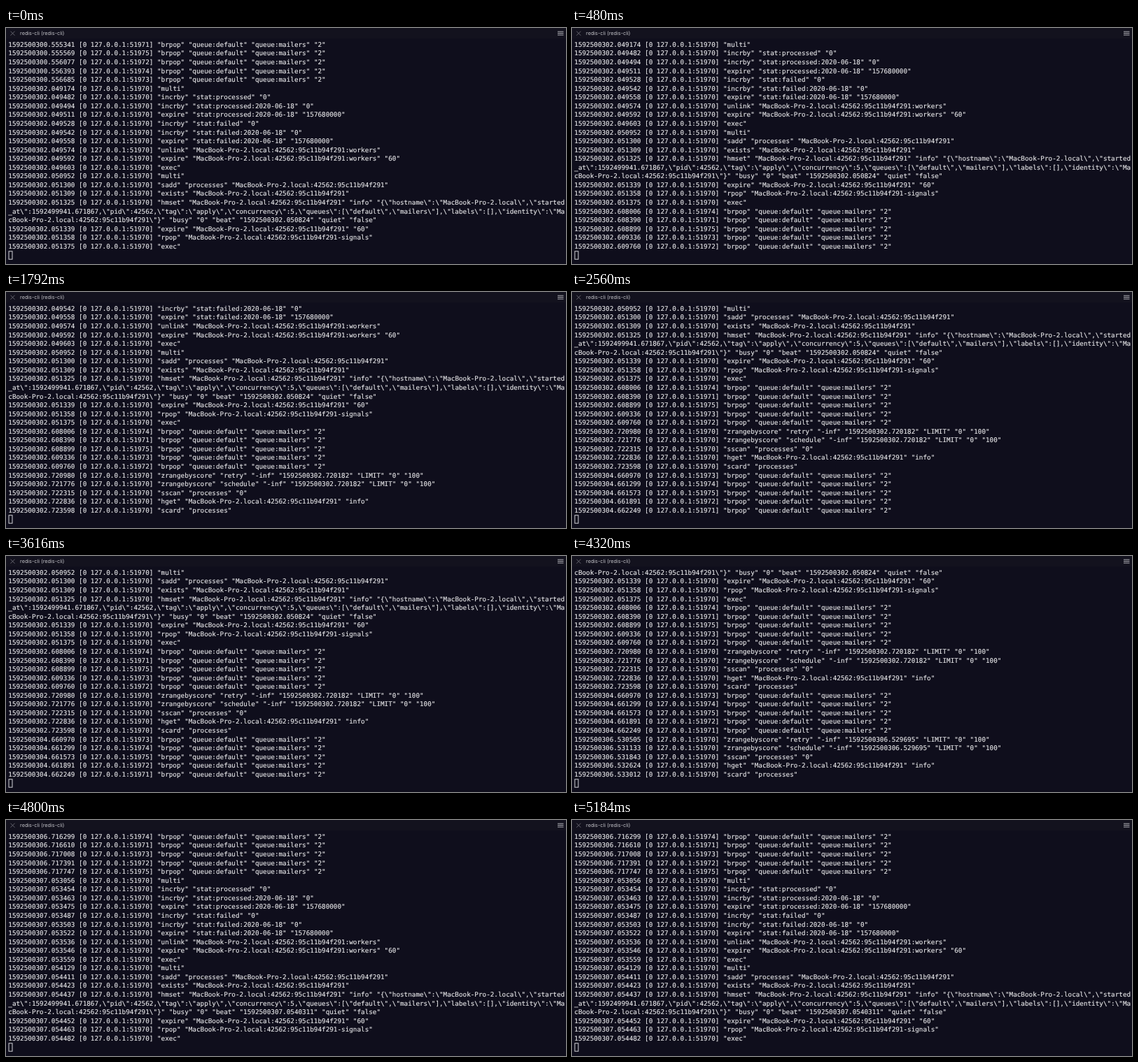
These frames come from a looping animation (800 px wide and 338 px high, 5.44 s). An HTML page:

```html
<!DOCTYPE html>
<html lang="en">
<head>
<meta charset="utf-8">
<title>redis-cli monitor</title>
<style>
  html, body { margin: 0; width: 100%; height: 100%; overflow: hidden; background: #0f0e1c; }
  svg { display: block; width: 800px; height: 338px; }
  text { text-rendering: geometricPrecision; }
  #log { font: 9.305px "DejaVu Sans Mono", Menlo, monospace; fill: #e6e6e8; stroke: #e6e6e8; stroke-width: .15; }
  #title { font: 7.3px Inter, sans-serif; fill: #c3c3c8; }
</style>
</head>
<body>
<svg viewBox="0 0 800 338">
  <rect width="800" height="338" fill="#0f0e1c"/>
  <rect width="800" height="15" fill="#13121e"/>
  <path d="M6.5 4.7l6 6m0-6l-6 6" stroke="#77777f" stroke-width=".8"/>
  <text id="title" x="20" y="10.2">redis-cli (redis-cli)</text>
  <path d="M788 5.2h8.5m-8.5 2.4h8.5m-8.5 2.4h8.5" stroke="#b4b4ba"/>
  <!-- the tiny tilt keeps baselines from snapping to whole pixels -->
  <text id="log" transform="rotate(.001)"></text>
  <rect x="4" y="319.8" width="5" height="11.4" fill="none" stroke="#d2d2d6"/>
</svg>
<script>
const COLS = 142, ROWS = 24, LEFT = 3.3, BASELINE = 26.8, PITCH = 12.57;
const LOOP = 5440;
const HOST = 'MacBook-Pro-2.local', ID = HOST + ':42562:95c11b94f291';
const EPOCH = '1592500';
const rows = [], screens = [];

let seed = 7;
function random() {
  seed = seed * 16807 % 2147483647;
  return seed / 2147483647;
}

// Server clock in microseconds.
let clock = 0;
const setClock = sec => clock = Math.round(sec * 1e6);
const wait = micros => clock += Math.round(micros * (0.6 + 0.8 * random()));

// Adds one monitor entry, wrapped at the terminal width.
function add(port, ...args) {
  const quoted = args.map(a => `"${a.replace(/"/g, '\\"')}"`).join(' ');
  const line = `${EPOCH}${(clock / 1e6).toFixed(6)} [0 127.0.0.1:${port}] ${quoted}`;
  for (let i = 0; i < line.length; i += COLS) rows.push(line.slice(i, i + COLS));
}

// Each digit of order is the last digit of a worker's port.
function pops(sec, order) {
  setClock(sec);
  for (const digit of order) {
    add('5197' + digit, 'brpop', 'queue:default', 'queue:mailers', '2');
    wait(380);
  }
}

function poll(score) {
  const range = set => ['zrangebyscore', set, '-inf', EPOCH + score, 'LIMIT', '0', '100'];
  const commands = [
    range('retry'), range('schedule'), ['sscan', 'processes', '0'],
    ['hget', ID, 'info'], ['scard', 'processes']
  ];
  setClock(score);
  for (const command of commands) {
    wait(600);
    add(51970, ...command);
  }
}

function transaction(commands) {
  add(51970, 'multi');
  wait(300);
  for (const command of [...commands, ['exec']]) {
    add(51970, ...command);
    wait(14);
  }
}

function heartbeat(sec, beat) {
  const stat = name => {
    const key = 'stat:' + name, day = key + ':2020-06-18';
    return [['incrby', key, '0'], ['incrby', day, '0'], ['expire', day, '157680000']];
  };
  const info = JSON.stringify({
    hostname: HOST, started_at: 1592499941.671867, pid: 42562, tag: 'apply',
    concurrency: 5, queues: ['default', 'mailers'], labels: [], identity: ID
  });
  setClock(sec);
  transaction([
    ...stat('processed'), ...stat('failed'),
    ['unlink', ID + ':workers'], ['expire', ID + ':workers', '60']
  ]);
  setClock(beat);
  wait(110);
  transaction([
    ['sadd', 'processes', ID], ['exists', ID],
    ['hmset', ID, 'info', info, 'busy', '0', 'beat', EPOCH + beat, 'quiet', 'false'],
    ['expire', ID, '60'], ['rpop', ID + '-signals']
  ]);
}

// From this time (ms) on, everything logged so far is scrolled into view.
const show = time => screens.push({ time, top: rows.length - ROWS });

pops(300.555341, '15243');
heartbeat(302.049174, '302.050824');
show(0);
pops(302.608006, '41532');
show(480);
poll('302.720182');
show(640);
pops(304.660970, '34521');
show(2560);
poll('306.529695');
show(4320);
pops(306.716299, '41325');
show(4480);
heartbeat(307.053056, '307.0540311');
show(4800);

const log = document.getElementById('log');
const lines = Array.from({ length: ROWS }, (_, i) => {
  const line = document.createElementNS('http://www.w3.org/2000/svg', 'tspan');
  line.setAttribute('x', LEFT);
  line.setAttribute('y', BASELINE + i * PITCH);
  return log.appendChild(line);
});

const start = performance.now();
let shown = -1;
function draw() {
  const t = (performance.now() - start) % LOOP;
  const { top } = screens.findLast(s => s.time <= t);
  if (top !== shown) {
    lines.forEach((line, i) => line.textContent = rows[top + i]);
    shown = top;
  }
  requestAnimationFrame(draw);
}
draw();
</script>
</body>
</html>
```
